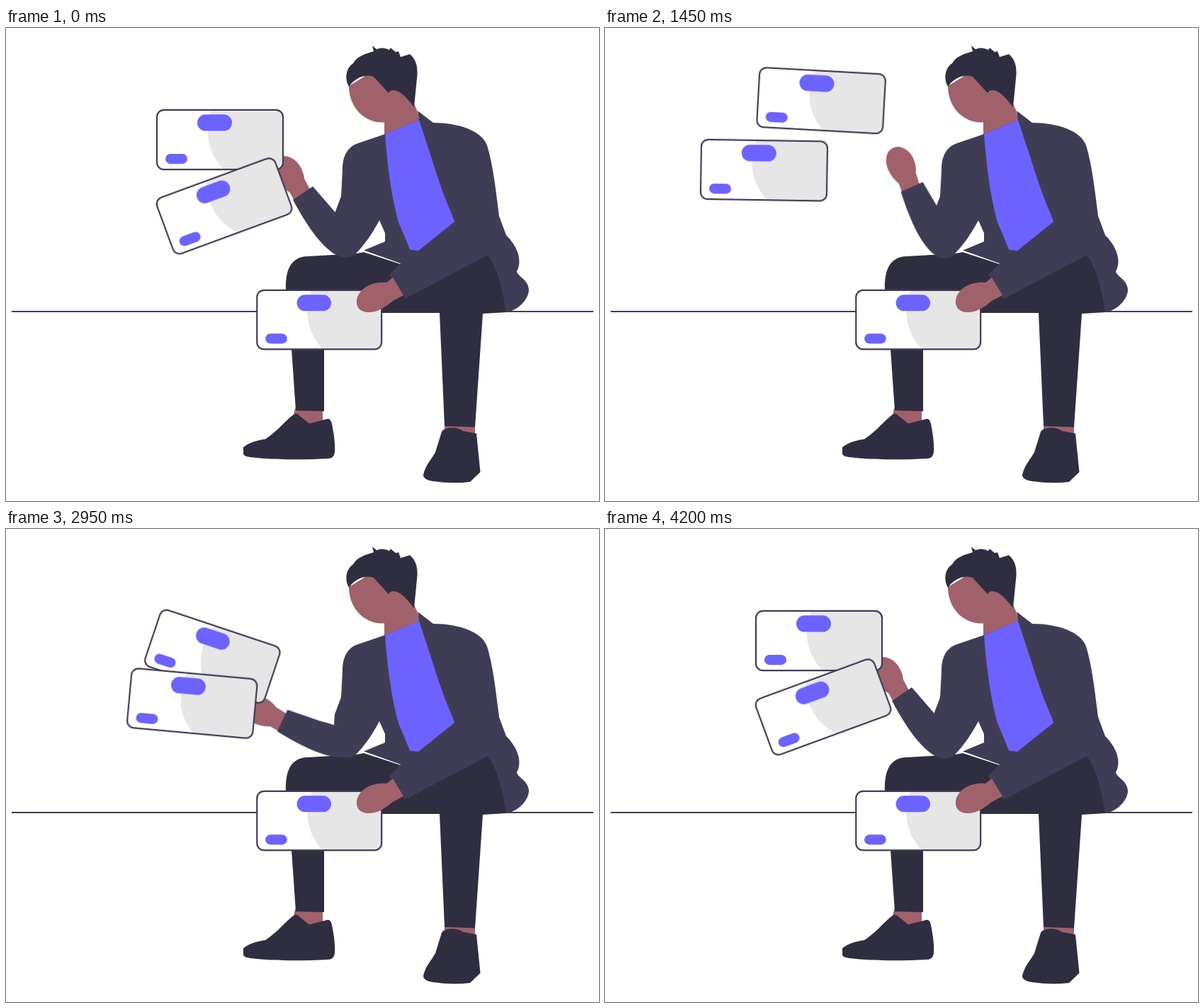
Write an HTML page that moves like this. It is 837 px wide and 669 px high and loops after 4.4 s.

```html
<!DOCTYPE html>
<html lang="en">
<head>
<meta charset="utf-8">
<title>Tossing cards</title>
<style>
  html, body { margin: 0; width: 100%; height: 100%; overflow: hidden; background: #fff; }
  svg { display: block; width: 837px; height: 669px; }
  .dark { fill: #2f2e41; }
  .coat { fill: #3f3d56; }
  .skin { fill: #a0616a; }
  .accent { fill: #6c63ff; }

  /* Paused: the script below sets the time in steps of 50 ms. */
  .arm, .back, .front { animation: 4400ms ease infinite paused; }
  .arm { animation-name: arm; transform-origin: 474px 306px; }
  .back { animation-name: back; }
  .front { animation-name: front; }

  @keyframes arm {
    0%, 6.82% { transform: rotate(0deg); }
    22.16% { transform: rotate(-38.6deg); }
    31.7% { transform: rotate(14deg); }
    41.25% { transform: rotate(-9.8deg); }
    51.14%, 57.95% { transform: rotate(0deg); }
    76.93% { transform: rotate(-38.6deg); }
    95.45%, 100% { transform: rotate(0deg); }
  }
  @keyframes back {
    0%, 6.82% { transform: translate(302px, 158px) rotate(0deg); }
    22.16% { transform: translate(286.7px, 206.5px) rotate(23.7deg); }
    41.02%, 57.95% { transform: translate(308px, 86.5px) rotate(0deg); }
    76.93% { transform: translate(286.7px, 206.5px) rotate(23.7deg); }
    95.45%, 100% { transform: translate(302px, 158px) rotate(0deg); }
  }
  @keyframes front {
    0%, 6.82% { transform: translate(308px, 251.8px) rotate(-20.2deg); }
    22.16% { transform: translate(275.7px, 262px) rotate(6.7deg); }
    41.02%, 57.95% { transform: translate(216.5px, 191.7px) rotate(0deg); }
    76.93% { transform: translate(275.7px, 262px) rotate(6.7deg); }
    95.45%, 100% { transform: translate(308px, 251.8px) rotate(-20.2deg); }
  }
</style>
</head>
<body>
<svg viewBox="0 0 837 669">
  <defs>
    <g id="card">
      <rect x="-89" y="-42.2" width="178" height="84.4" rx="10" fill="#fff"/>
      <path d="M-11-42.2A77 77 0 0 0 5 42.2H79A10 10 0 0 0 89 32.2V-32.2A10 10 0 0 0 79-42.2Z" fill="#e6e6e6"/>
      <rect class="accent" x="-32" y="-35.7" width="49" height="23.3" rx="11.6"/>
      <rect class="accent" x="-77" y="20" width="31" height="14.2" rx="7.1"/>
      <rect x="-89" y="-42.2" width="178" height="84.4" rx="10" fill="none" stroke="#3f3d56" stroke-width="2.2"/>
    </g>
  </defs>

  <path d="M8 401H829" stroke="#3f3d56" stroke-width="2.2"/>

  <!-- legs -->
  <path class="skin" d="M408 538H447V557L428 562L406 547ZM619 560H662V575H619Z"/>
  <path class="dark" d="M395 372C394 342 402 324 425 323L494 319L505 317L557 334L680 320C696 340 704 370 707 402L673 404L662 564.500L619 563L612 403H449V542L409 541L403 454Z"/>
  <path class="dark" d="M335 593C345 585 357 583 366 581.500C385 569 395 554 407 546Q411 544 415 549L428 559.500L453 553Q458 551 460 560C463 575 465 590 464 600Q463 609 454 609C420 611 375 611 345 607Q335 606 335 602Z"/>
  <path class="dark" d="M615 571Q618 565 632 565.500Q640 566 645 570L664 573.500L669.500 628L655 642Q630 645 603 641Q589 639 589 632C592 618 602 608 606 600Z"/>

  <!-- head -->
  <path class="skin" d="M534 152V133.500C506 135 484 112 484 82L520 60L570 95L580 116L584 132Z"/>
  <path class="dark" d="M484 83C478 73 479 57 490 50C495 41 504 37 519 33L517 25L523 30Q532 26 541 31L543 28L550 34L554 33L557 41L570 37C578 44 581 52 580.500 66L576 112C568 102 558 88 546 88Q542 88 540 92L519 69C506 64 491 72 484 83Z"/>

  <!-- torso -->
  <path class="dark" d="M566 308L586 312L576 321Z"/>
  <path class="coat" d="M535 150L497 163C478 169 475 188 475 200L473 238L464 262L462 290L468 318Q480 329 494 319Q511 302 527 272L535 290V302L505 314.500L557 333L541 349L563 383L680 321C694 340 701 370 706 402C722 400 738 384 738 370C737 355 722 352 721 344C727 334 727 314 706 293L696 266C692 235 688 195 679 166C672 146 640 134 603 134L581 117L583 130Z"/>
  <path class="accent" d="M535 150L583 130L600 182Q617 237 630 265L633 274L582 315L570 313.500Q563 295 554 275C543 235 538 190 535 150Z"/>

  <!-- tossing arm -->
  <g class="arm">
    <path class="skin" d="M429 228L421 213C420 198 408 180 390 181C376 184 373 198 379 211C384 221 394 229 400 232L408 246Z"/>
    <path class="coat" d="M433 224L405 243C422 275 444 309 466 321Q480 329 494 319L500 300L474 270L465 261Z"/>
  </g>

  <use href="#card" class="back"/>
  <use href="#card" class="front"/>

  <!-- card held in the other hand -->
  <use href="#card" transform="translate(442.2 412.600) scale(.988)"/>
  <path class="skin" d="M546 353L561 378L546 386C536 394 526 402 512 402C499 402 494 394 495 385C498 367 518 358 537 360Z"/>
</svg>
<script>
  const LOOP = 4400, STEP = 50;
  const parts = document.getAnimations();
  const start = performance.now();

  function draw() {
    const t = (performance.now() - start) % LOOP;
    const time = Math.floor(t / STEP) * STEP;
    for (const part of parts) part.currentTime = time;
    requestAnimationFrame(draw);
  }
  draw();
</script>
</body>
</html>
```
